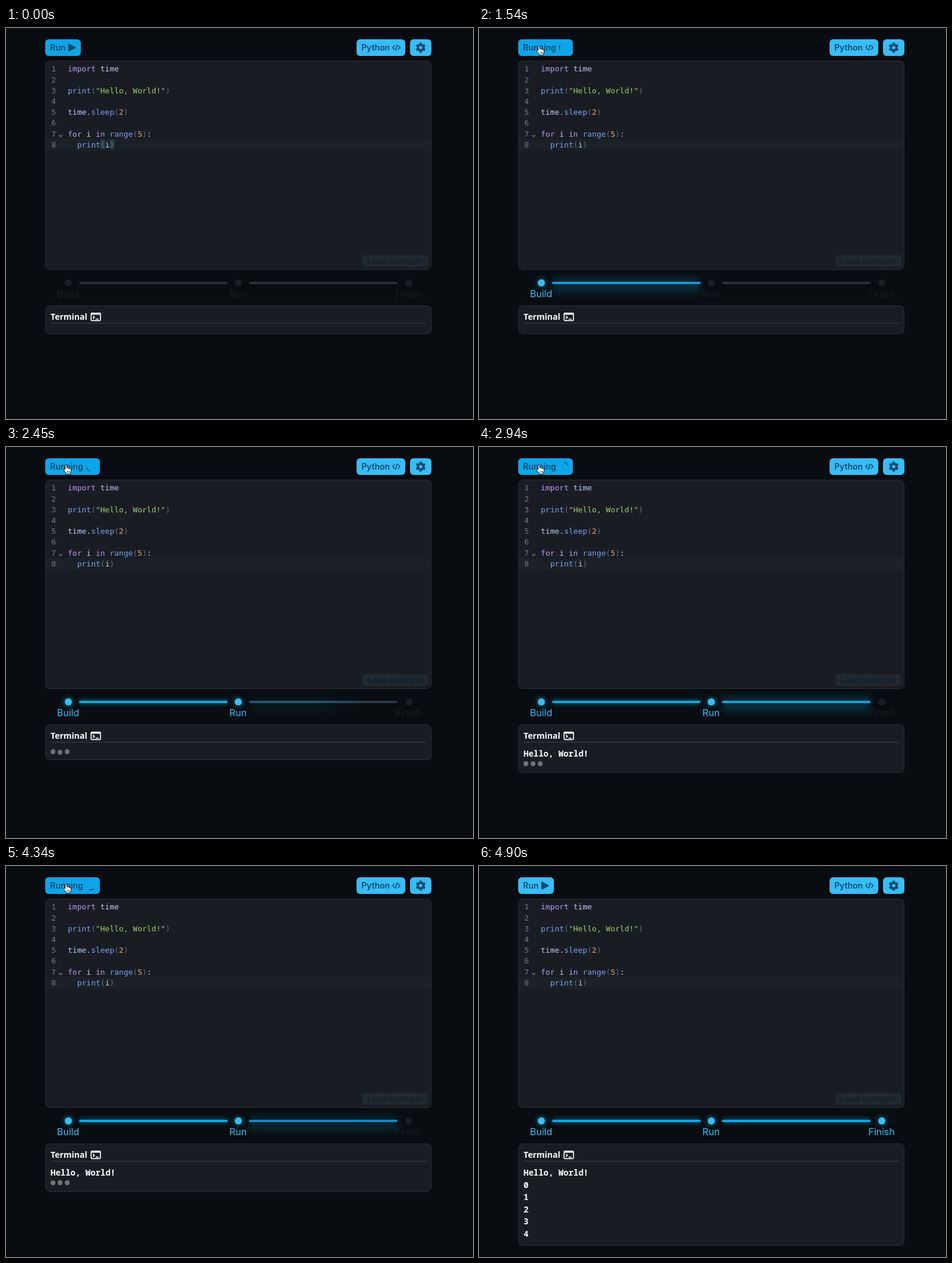
An HTML page that plays this animation: 786 px wide and 658 px high, repeating every 5040 ms.

```html
<!DOCTYPE html>
<html lang="en">
<head>
<meta charset="utf-8">
<title>Code runner</title>
<style>
  html, body { margin: 0; width: 100%; height: 100%; overflow: hidden; background: #090c10; }
  svg { display: block; width: 786px; height: 658px; }
  text { white-space: pre; }
  .ui { font: 600 14px Inter, sans-serif; fill: #0c4a6e; }
  .code { font: 13px "DejaVu Sans Mono", monospace; fill: #747ca1; }
  .num { text-anchor: end; fill: #737983; }
  .kw { fill: #bb9af7; }
  .fn { fill: #7aa2f7; }
  .var { fill: #c0caf5; }
  .str { fill: #9ece6a; }
  .lit { fill: #f0a070; }
  .pt { fill: #646b80; }
  .card { fill: #191d23; stroke: #2b2f38; }
  .out { font: 700 14px "Noto Sans Mono", monospace; fill: #fff; }
  .title { font: 700 14px "Noto Sans", sans-serif; fill: #fff; }
  .step { font: 16px Inter, sans-serif; fill: #1a1e24; text-anchor: middle; }
  .step circle { fill: #1a1e24; }
  .step.on, .step.on circle { fill: #38bdf8; }
  .step.on circle { filter: drop-shadow(0 0 5px #0891b2); }
  .track { fill: #2b2f3a; }
  .halo { filter: blur(7px); opacity: .27; }
  .done .halo { display: none; }
  .done .fill { filter: drop-shadow(0 0 4px #0891b2); }
</style>
</head>
<body>
<svg viewBox="0 0 786 658">
  <defs>
    <linearGradient id="sweep" gradientUnits="userSpaceOnUse">
      <stop stop-color="#0ea5e9"/>
      <stop offset="1" stop-color="#0ea5e9" stop-opacity=".25"/>
    </linearGradient>
    <linearGradient id="haze" href="#sweep" gradientUnits="userSpaceOnUse">
      <stop stop-color="#0891b2"/>
      <stop offset="1" stop-color="#0891b2" stop-opacity="0"/>
    </linearGradient>
  </defs>

  <!-- toolbar -->
  <rect id="button" x="66" y="19" width="60" height="28" rx="6"/>
  <text id="label" class="ui" x="74" y="38">Run</text>
  <path id="play" d="M106 27.5V38.5L116.5 33Z" fill="#0c4a6e" stroke="#0c4a6e" stroke-width="2.4" stroke-linejoin="round"/>
  <path id="spinner" d="M5.66-5.66A8 8 0 0 1 5.66 5.66A24 24 0 0 0 5.66-5.66Z" fill="#0c4a6e"/>
  <g fill="#38bdf8">
    <rect x="590" y="19" width="82" height="28" rx="6"/>
    <rect x="680" y="19" width="36" height="28" rx="6"/>
  </g>
  <text class="ui" x="598" y="38">Python</text>
  <g fill="none" stroke="#0c4a6e">
    <path d="M653.8 29.8L650.8 33L653.8 36.2M660.2 29.8L663.2 33L660.2 36.2M658.3 28.3L655.7 37.7" stroke-width="1.6" stroke-linecap="round" stroke-linejoin="round"/>
    <circle cx="698" cy="33" r="4.7" stroke-width="3.8"/>
    <circle cx="698" cy="33" r="7.1" stroke-width="2.6" pathLength="12" stroke-dasharray="1.1 .9" transform="rotate(-106 698 33)"/>
  </g>

  <!-- editor -->
  <rect class="card" x="66.5" y="55.5" width="649" height="351" rx="7"/>
  <rect x="67" y="187" width="648" height="19" fill="#1b2126"/>
  <rect x="67" y="187" width="31" height="19" fill="#1d2227"/>
  <path id="match" d="M159 188h7.5v15h-7.5zM174.4 188h7.8v15h-7.8z" fill="#28434a"/>
  <g id="editor" class="code"></g>
  <path d="M89.4 180.2L92 182.8L94.6 180.2" fill="none" stroke="#8a909a" stroke-width="1.2"/>
  <rect x="600" y="382" width="111" height="20" rx="5" fill="#212831"/>
  <text class="ui" x="608" y="397" style="fill:#161c24">Load example</text>

  <!-- progress -->
  <g id="bars"></g>
  <g id="steps"></g>

  <!-- terminal -->
  <rect id="terminal" class="card" x="66.5" y="467.5" width="649" rx="7"/>
  <text class="title" x="75" y="491">Terminal</text>
  <g fill="none" stroke="#fff" stroke-width="1.6">
    <rect x="143.2" y="479.8" width="15.8" height="12.6" rx="1.4"/>
    <path d="M143 481.2H159" stroke-width="2.6"/>
    <path d="M146.2 484.6L148.8 487L146.2 489.4M151 489.7H155.6"/>
  </g>
  <rect x="75" y="496" width="632" height="1.6" fill="#30343d"/>
  <g id="output" class="out"></g>
  <g id="dots" fill="#6d7178"></g>

  <g id="hand" transform="translate(96 29)" stroke="#000" stroke-linejoin="round">
    <path d="M3.5 2.2C3.5.6 6.3.6 6.3 2.2V6.3C6.6 5.6 8.7 5.6 8.9 6.9C9.4 6.3 11.2 6.4 11.4 7.6C12 7.1 13.6 7.3 13.6 8.8V11.5C13.6 13 12.6 14 12.4 16.5H5.8C5.4 14.6 2.9 12.4 1 9.7C.2 8.4 1.8 7.4 2.9 8.5L3.5 9.2Z" fill="#fff"/>
    <path d="M7.2 11.5V14.5M9.2 11.5V14.5M11.2 11.5V14.5" stroke-width=".8"/>
  </g>
</svg>
<script>
const LOOP = 5040, TICK = 70, PULSE = 1600, BOUNCE = 1120;
const AT = { hand: 490, build: 560, run: 2240, hello: 2590, numbers: 4620, finish: 4760, leave: 4830 };
const $ = id => document.getElementById(id);
const show = (el, on) => { el.style.display = on ? '' : 'none'; };
const clamp = v => Math.max(0, Math.min(1, v));

// each token is "class:text"
const program = [
  ['kw:import', 'var: time'],
  [],
  ['fn:print', 'pt:(', 'str:"Hello, World!"', 'pt:)'],
  [],
  ['var:time.', 'fn:sleep', 'pt:(', 'lit:2', 'pt:)'],
  [],
  ['kw:for', 'var: i ', 'kw:in', 'fn: range', 'pt:(', 'lit:5', 'pt:)', 'var::'],
  ['fn:  print', 'pt:(', 'var:i', 'pt:)']
];
$('editor').innerHTML = program.map((tokens, i) => {
  const y = 73.3 + 18.2 * i;
  const spans = tokens.map(token => {
    const cut = token.indexOf(':');
    return `<tspan class="${token.slice(0, cut)}">${token.slice(cut + 1)}</tspan>`;
  }).join('');
  return `<text class="num" x="84" y="${y}">${i + 1}</text><text x="104" y="${y}">${spans}</text>`;
}).join('');

$('output').innerHTML = ['Hello, World!', 0, 1, 2, 3, 4]
  .map((line, i) => `<text x="75" y="${521 + 20.5 * i}">${line}</text>`).join('');
$('dots').innerHTML = [79, 91, 103].map(x => `<circle cx="${x}" r="4.2"/>`).join('');
$('steps').innerHTML = [['Build', 105], ['Run', 391], ['Finish', 678]].map(([name, x]) =>
  `<g class="step"><circle cx="${x}" cy="429" r="6"/><text x="${x - .5}" y="453">${name}</text></g>`).join('');
$('bars').innerHTML = [123, 409].map(x => `
  <rect class="track" x="${x}" y="427" width="250" height="4" rx="2"/>
  <g><rect class="halo" x="${x}" y="420" width="250" height="26" fill="url(#haze)"/>
  <rect class="fill" x="${x}" y="427" width="250" height="4" rx="2"/></g>`).join('');

const lines = [...$('output').children];
const dots = [...$('dots').children];
const steps = [...$('steps').children];
const bars = [...$('bars').querySelectorAll('g')];

function drawBar(bar, x, t, start, end) {
  const done = t >= end, age = t - start;
  show(bar, age >= 0);
  bar.classList.toggle('done', done);
  bar.querySelector('.fill').setAttribute('fill', done ? '#0ea5e9' : 'url(#sweep)');
  bar.style.opacity = done ? 1 : .2 + .4 * (1 - Math.cos(2 * Math.PI * age / PULSE));
  if (age < 0 || done) return;
  const front = x + 250 * age / 310;
  for (const id of ['sweep', 'haze']) {
    $(id).setAttribute('x1', front - 50);
    $(id).setAttribute('x2', front + 30);
  }
}

function drawTerminal(t) {
  const count = t >= AT.numbers ? 6 : t >= AT.hello ? 1 : 0;
  const waiting = t >= AT.run && t < AT.finish;
  lines.forEach((line, i) => show(line, i < count));
  show($('dots'), waiting);
  const bottom = (count ? 515.5 + 20.5 * count : 514.5) + (waiting ? 12 : 0);
  $('terminal').setAttribute('height', bottom - 467.5);
  const base = 512.5 + 20.5 * count;
  dots.forEach((dot, i) => {
    const phase = (t - 2450 + (1 - i) * 170 + BOUNCE * 3.5) % BOUNCE - BOUNCE / 2;
    const dip = Math.cos(Math.PI / 2 * clamp(Math.abs(phase) / 230)) ** 2;
    dot.setAttribute('cy', base + 1.3 * dip);
  });
}

function draw(t) {
  const running = t >= AT.build && t < AT.finish;
  $('button').setAttribute('width', running ? 92 : 60);
  $('button').setAttribute('fill', t < AT.leave ? '#0ea5e9' : '#38bdf8');
  $('label').textContent = running ? 'Running' : 'Run';
  show($('play'), !running);
  show($('spinner'), running);
  $('spinner').setAttribute('transform', `translate(142.5 33) rotate(${347 + .349 * (t - 980)})`);
  show($('hand'), t >= AT.hand && t < AT.leave);
  show($('match'), t < AT.build);
  [AT.build, AT.run, AT.finish].forEach((start, i) => steps[i].classList.toggle('on', t >= start));
  drawBar(bars[0], 123, t, AT.build, AT.run);
  drawBar(bars[1], 409, t, AT.run, AT.finish);
  drawTerminal(t);
}

const origin = performance.now();
function frame() {
  const t = (performance.now() - origin) % LOOP;
  draw(Math.floor(t / TICK) * TICK);
  requestAnimationFrame(frame);
}
frame();
</script>
</body>
</html>
```
